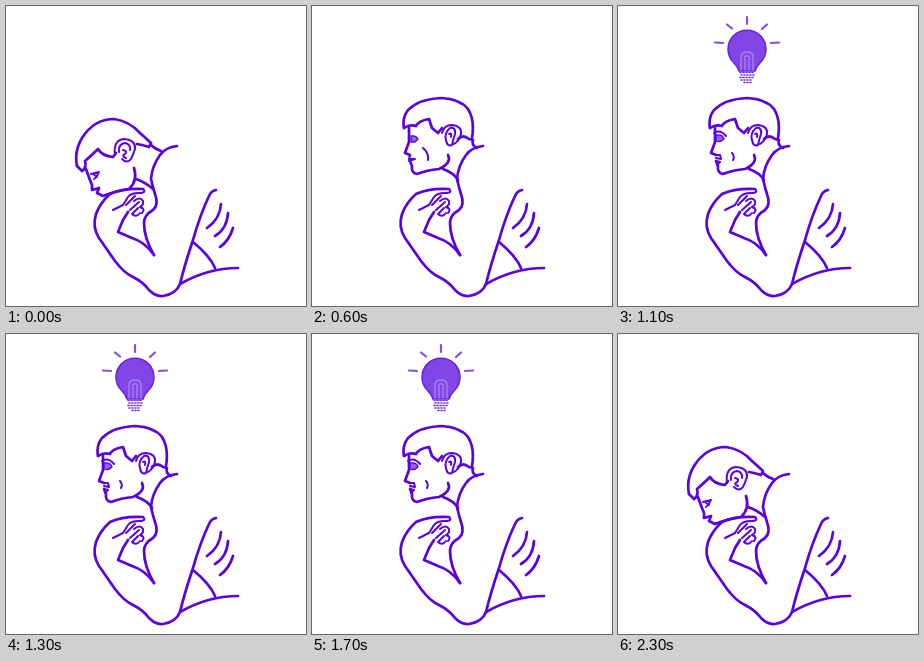
An HTML page that plays this animation: 300x300 px, repeating every 2.8 s.

```html
<!DOCTYPE html>
<html lang="en">
<head>
<meta charset="utf-8">
<title>Thinking</title>
<style>
  html, body { margin: 0; width: 100%; height: 100%; overflow: hidden; background: #fff; }
  svg { display: block; width: 100vw; height: 100vh; }
  .ink { fill: none; stroke: #5a00e6; stroke-width: 2.7; stroke-linecap: round; stroke-linejoin: round; }
  .fine { stroke-width: 2; }
  .iris { fill: #9563ea; stroke-width: 1.3; }

  /* Every change is a hard cut within one 2.8 s loop. */
  .down, .up, .calm, .idea { animation: 2.8s step-end infinite; }
  .down { animation-name: down, lean; }
  .up { animation-name: up; }
  .calm { animation-name: calm; }
  .idea { animation-name: idea; }
  .glass { animation: pulse .2s step-end infinite; }

  @keyframes down {
    0% { opacity: 1; }
    21.4286% { opacity: 0; }
    75%, 100% { opacity: 1; }
  }
  @keyframes lean {
    0% { transform: none; }
    10.7143% { transform: translateX(-2px); }
    21.4286% { transform: none; }
    75% { transform: translateX(-2px); }
    82.1429%, 100% { transform: none; }
  }
  @keyframes up {
    0% { opacity: 0; }
    21.4286% { opacity: 1; }
    75%, 100% { opacity: 0; }
  }
  @keyframes calm {
    0% { opacity: 1; }
    32.1429% { opacity: 0; }
    67.8571%, 100% { opacity: 1; }
  }
  @keyframes idea {
    0% { opacity: 0; }
    32.1429% { opacity: 1; }
    67.8571%, 100% { opacity: 0; }
  }
  @keyframes pulse {
    0% { fill: #a77bed; }
    50%, 100% { fill: #8346e6; }
  }
</style>
</head>
<body>
<svg viewBox="0 0 300 300" aria-label="A man thinks and has an idea">
  <g class="ink">
    <!-- neck, chest and arms -->
    <path d="M171 140Q160 141 154 149Q146 160 145 173Q147 182 149 188Q153 199 147 204Q138 209 138 217Q138 232 148 249"/>
    <path d="M137 183Q117 182 104 188Q94 197 90 208Q86 221 93 232L109 255Q118 267 127 271Q137 276 143 284Q150 291 157 290Q170 288 174 278Q178 261 187 234Q194 209 203 190Q205 185 210 184"/>
    <path d="M174 278Q202 262 232 262M187 236Q204 250 209 262"/>
    <path d="M148 249Q139 236 126 232L112 226L117 214L122 206"/>
    <path d="M215 198Q214 213 201 222M222 207Q221 223 209 230M227 222Q223 235 214 241"/>
    <!-- hand -->
    <path class="fine" d="M137 183Q141 187 133 187Q125 187 122 191L117 199L107 204M129 190L120 199M128 195Q134 190 137 195Q138 199 134 201M133 196L124 204M134 201Q140 203 136 207M132 202L126 208Q130 212 134 207"/>
  </g>

  <g class="ink down">
    <path d="M71 160Q68 145 76 132Q88 113 108 113Q123 115 134 127L145 137L143 141Q137 139 131 138"/>
    <path d="M71 160L76 165Q81 162 79 155Q87 148 92 143Q96 150 107 151L110 147"/>
    <path class="fine" d="M109 149Q107 134 118 133Q130 134 129 143Q127 149 125 153Q121 158 116 153M113 146Q112 138 119 137Q125 138 124 144M117 144Q122 145 119 148Q115 150 120 152"/>
    <path d="M145 139Q149 143 155 145"/>
    <path d="M80 163Q83 172 86 179L86 184L93 182L91 187L97 190Q109 185 123 183Q132 175 128 162M130 173Q139 176 147 183"/>
    <path class="fine" d="M85 168L93 166Q91 171 88 173M87 168L91 171"/>
  </g>

  <g class="ink up">
    <path d="M92 122Q90 112 96 104Q107 93 129 92Q148 93 156 103Q163 114 160 132"/>
    <path d="M92 122Q98 118 104 120Q106 115 117 113L120 122L126 127L130 122"/>
    <path class="fine" d="M130 127Q132 119 140 119Q150 120 149 128Q147 135 142 138M134 134Q132 127 138 122Q144 121 143 128Q141 134 140 139Q135 141 134 134M137 128Q140 126 139 131"/>
    <path d="M146 133Q151 128 157 133L161 134Q159 139 165 142"/>
    <path d="M97 122L97 136L93 147L98 149M98 155L100 160Q99 167 105 168Q115 164 127 163Q140 157 136 149M131 163Q142 167 146 174"/>
    <g class="calm">
      <path class="fine" d="M111 142Q117 147 116 154M98 149L97 153L103 153L97 155"/>
      <path class="iris" d="M99 130Q104 129 106 133L103 136L99 136Z"/>
    </g>
    <g class="idea">
      <path class="fine" d="M114 147Q117 150 115 154M96 127Q102 123 108 130M98 149L102 149L103 153L98 152M98 155L102 156L99 159"/>
      <path class="iris" d="M98 129Q105 128 106 133Q102 137 98 135Z"/>
    </g>
  </g>

  <g class="idea" fill="none" stroke-linecap="round">
    <path stroke="#8250e7" stroke-width="2.2" d="M97 36.5L105 37M153 37L161 36.5M109 18.5L114 22.5M149 18.5L144 23M129 11V18"/>
    <path class="glass" stroke="#6720df" stroke-width="1.5" d="M121 65Q120 61 116 57A19 19 0 1 1 142 57Q138 61 137 65Z"/>
    <path stroke="#a985ef" stroke-width="1.3" d="M123 64V51Q123 46 129 46Q135 46 135 51V64M127 64V54Q125 50 129 50Q133 50 131 54V64"/>
    <path stroke="#6b2ae0" stroke-width="1.6" stroke-dasharray="1 2" d="M122 66.5H136M123 69H136M122 71.5H136M123 74H135M126 76.5H133"/>
  </g>
</svg>
</body>
</html>
```
